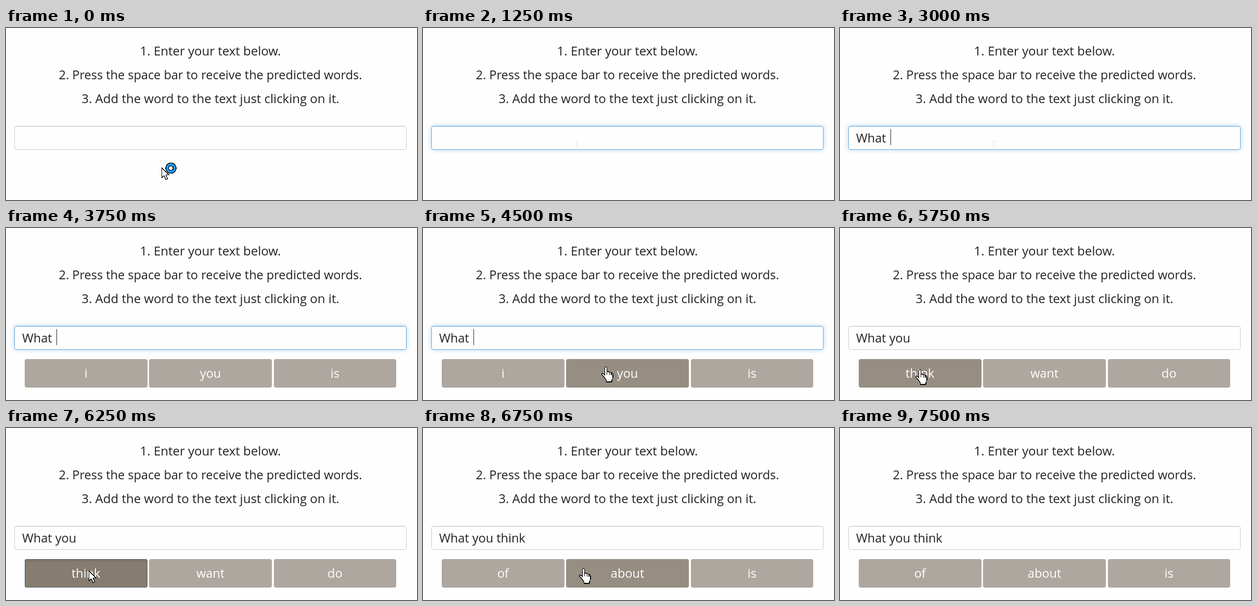
Animation, 790 px wide and 332 px high, one loop 8.5 s. Source, as an HTML page:

```html
<!DOCTYPE html>
<html lang="en">
<head>
<meta charset="utf-8">
<title>Word prediction</title>
<style>
  html, body { margin: 0; width: 100%; height: 100%; overflow: hidden; background: #fefefe; }
  #stage {
    position: relative; width: 790px; height: 332px; overflow: hidden;
    font: 23.5px "Open Sans", "Noto Sans", sans-serif; color: #222; white-space: pre;
  }
  #stage > * { position: absolute; box-sizing: border-box; }
  #steps { left: 0; top: 21px; width: 786px; text-align: center; }
  #steps div { height: 46px; line-height: 46px; font-size: 24px; }
  #steps .long { font-size: 23.5px; }
  #field {
    left: 16px; top: 189px; width: 754px; height: 46px; padding-left: 14px; line-height: 44px;
    border: 1px solid #ccc; border-radius: 4px; box-shadow: inset 0 1px 1px rgba(0,0,0,.075);
  }
  #field.focus {
    border-color: #68a6da;
    box-shadow: inset 0 1px 1px rgba(0,0,0,.075), 0 0 8px rgba(102,175,233,.5);
  }
  #caret { top: 195px; width: 1px; height: 31px; background: #222; }
  .word {
    top: 253px; width: 235.5px; height: 55px; line-height: 55px; text-align: center;
    color: #fff; background: #aea79f; border-radius: 4px;
  }
  .word.hover { background: #978e83; }
  .word.pressed {
    background: #877c70; box-shadow: inset 0 3px 5px rgba(0,0,0,.125);
    outline: 1px dotted #35607f; outline-offset: -1px;
  }
  #pointers { left: 0; top: 0; }
</style>
</head>
<body>
<div id="stage">
  <div id="steps"><div>1. Enter your text below.</div><div class="long">2. Press the space bar to receive the predicted words.</div><div>3. Add the word to the text just clicking on it.</div></div>
  <div id="field"></div>
  <div id="caret"></div>
  <div class="word" style="left:36px"></div>
  <div class="word" style="left:275.3px"></div>
  <div class="word" style="left:514.6px"></div>
  <svg id="pointers" width="790" height="332" fill="#fff" stroke="#000" stroke-width="1.3" stroke-linejoin="round" shape-rendering="crispEdges">
    <defs><path id="shape" d="M.5 .5V20L5 16L8.3 23.7L11.6 22.2L8.3 14.8H14Z"/></defs>
    <g data-kind="arrow"><use href="#shape"/></g>
    <g data-kind="busy">
      <use href="#shape"/>
      <circle cx="18" cy="1.5" r="10" fill="#2498f0"/>
      <circle cx="18" cy="1.5" r="4.3"/>
    </g>
    <g data-kind="beam" fill="none" stroke="#e6e6e6" stroke-width="1">
      <path d="M-4 .5H-1L0 1.5L1 .5H4M0 1.5V17.5M-4 18.5H-1L0 17.5L1 18.5H4"/>
    </g>
    <g data-kind="hand">
      <path d="M6.5 2.5Q8.5 -.5 10.5 2.5V10.5L13 10Q15 10 15.5 12Q18 11 19 13Q21.5 12.5 22 15V22L20 26V30H9.5V27L5.5 21L1 16.5Q0 13.5 3 14L6.5 17Z"/>
      <path d="M10.5 10.5V16M15.5 12V16.5M19 13V17" fill="none"/>
    </g>
  </svg>
</div>
<script>
const LOOP = 8500;

// Each step: start time in ms and the properties that change there.
const steps = [
  [0, { text: "", focus: false, caret: null, words: null, hover: -1, pressed: -1, pointer: ["busy", 299, 269] }],
  [250, { pointer: null }],
  [750, { focus: true, caret: 31, pointer: ["beam", 295.5, 218] }],
  [1250, { caret: null }],
  [1750, { caret: 31 }],
  [2000, { text: "W", caret: 54 }],
  [2250, { text: "Wha", caret: 79 }],
  [2500, { text: "What", caret: 92 }],
  [3000, { text: "What ", caret: 97 }],
  [3500, { words: ["i", "you", "is"] }],
  [3750, { pointer: null }],
  [4000, { caret: null, pointer: ["arrow", 338, 256] }],
  [4250, { hover: 1, pointer: ["hand", 343, 267] }],
  [4500, { caret: 97 }],
  [4750, { focus: false, caret: null, pressed: 1, pointer: ["arrow", 343, 267] }],
  [5000, { text: "What you", words: ["think", "want", "do"], pressed: -1 }],
  [5500, { hover: -1, pointer: ["arrow", 177, 272] }],
  [5750, { hover: 0, pointer: ["hand", 145, 272] }],
  [6000, { pointer: ["hand", 152, 272] }],
  [6250, { pressed: 0, pointer: ["arrow", 159, 275] }],
  [6500, { text: "What you think", words: ["of", "about", "is"] }],
  [6750, { hover: 1, pressed: -1, pointer: ["hand", 300, 270] }],
  [7000, { hover: -1, pointer: null }],
];

const field = document.getElementById("field");
const caret = document.getElementById("caret");
const buttons = document.querySelectorAll(".word");
const pointers = document.querySelectorAll("[data-kind]");
const show = (el, on) => { el.style.visibility = on ? "visible" : "hidden"; };

function stateAt(time) {
  return Object.assign({}, ...steps.filter(([at]) => at <= time).map(([, change]) => change));
}

function render(time) {
  const { text, focus, caret: x, words, hover, pressed, pointer } = stateAt(time);
  field.textContent = text;
  field.classList.toggle("focus", focus);
  show(caret, x !== null);
  caret.style.left = `${x || 0}px`;
  buttons.forEach((button, i) => {
    show(button, words);
    button.textContent = words ? words[i] : "";
    button.classList.toggle("hover", hover === i);
    button.classList.toggle("pressed", pressed === i);
  });
  pointers.forEach(el => {
    const active = pointer && pointer[0] === el.dataset.kind;
    show(el, active);
    if (active) el.setAttribute("transform", `translate(${pointer[1]} ${pointer[2]})`);
  });
}

const start = performance.now();
function tick() {
  render((performance.now() - start) % LOOP);
  requestAnimationFrame(tick);
}
tick();
</script>
</body>
</html>
```
